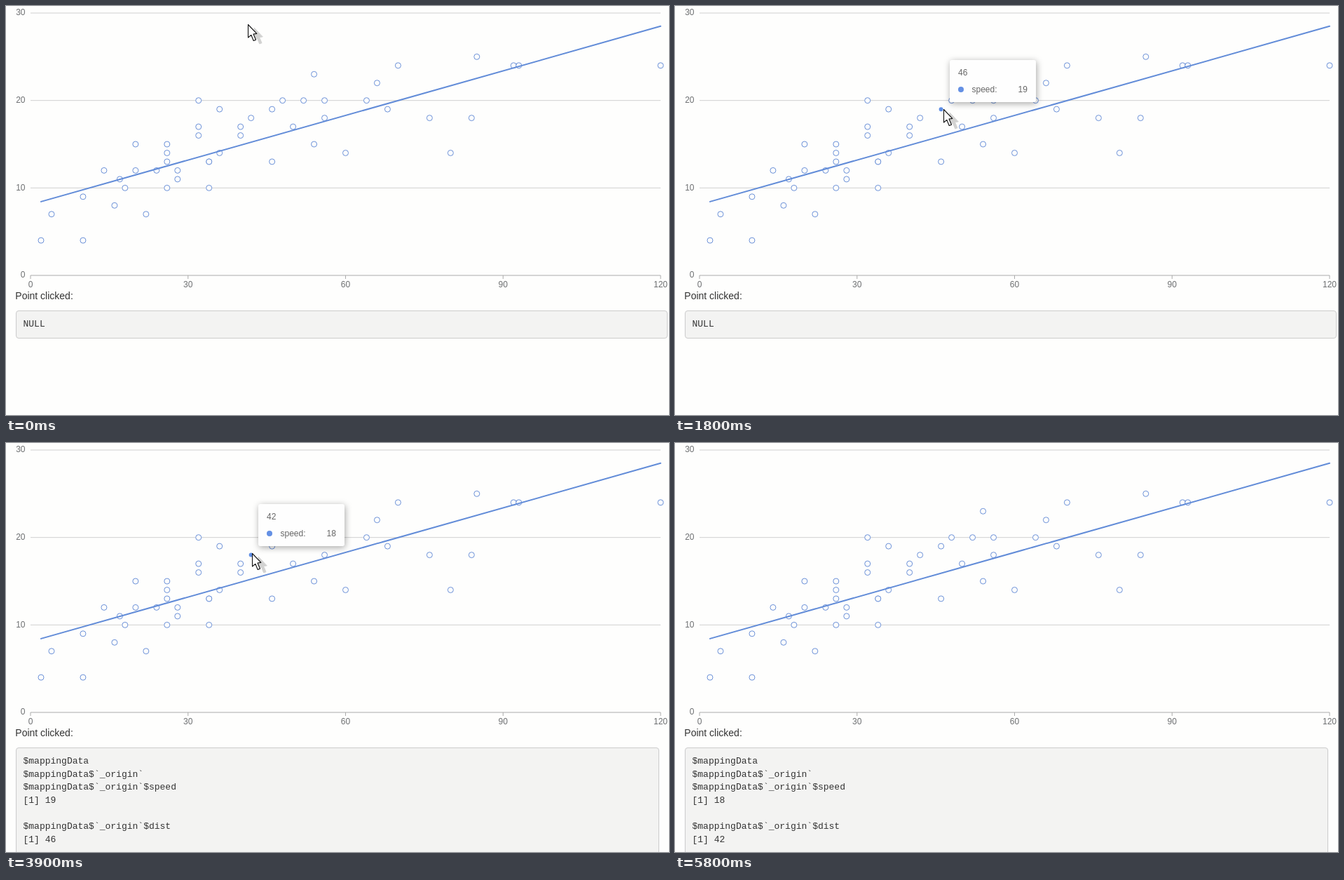
These frames come from a looping animation (946 px wide and 583 px high, 6.4 s). An HTML page:

```html
<!DOCTYPE html>
<html lang="en">
<head>
<meta charset="utf-8">
<title>Scatter plot with tooltip</title>
<style>
  html, body { margin: 0; width: 100%; height: 100%; overflow: hidden; background: #fefefd; }
  svg { display: block; font: 12px "Liberation Sans", Arial, sans-serif; }
  .grid { stroke: #d0d0d0; }
  .axis { stroke: #ababab; }
  .label { fill: #6e7072; }
  .ring { fill: #fefefd; stroke: #6a90d8; }
  .fit { stroke: #628cd8; stroke-width: 2; stroke-linecap: round; }
  .dot { fill: #5f8ee4; stroke: #fefefd; stroke-width: 2; }
  .heading { font-size: 14px; fill: #333; }
  .panel { fill: #f3f3f2; stroke: #ccc; }
  .mono { font: 13px "Liberation Mono", "Courier New", monospace; fill: #333; }
  .tip text { fill: #666; }
  .card { fill: #fefefe; filter: drop-shadow(1px 2px 5px rgba(0, 0, 0, .35)); }
  .arrow { fill: #fefefe; stroke: #111; stroke-width: 1.1; stroke-linejoin: round; }
  .shade { fill: #000; stroke: #000; opacity: .17; filter: blur(.7px); }
</style>
</head>
<body>
<script>
const LOOP = 6400, STEP = 100;

// Stopping distances grouped by speed.
const cars = {
  4: [2, 10], 7: [4, 22], 8: [16], 9: [10], 10: [18, 26, 34], 11: [17, 28],
  12: [14, 20, 24, 28], 13: [26, 34, 34, 46], 14: [26, 36, 60, 80],
  15: [20, 26, 54], 16: [32, 40], 17: [32, 40, 50], 18: [42, 56, 76, 84],
  19: [36, 46, 68], 20: [32, 48, 52, 56, 64], 22: [66], 23: [54],
  24: [70, 92, 93, 120], 25: [85]
};
const first = { dist: 46, speed: 19 }, second = { dist: 42, speed: 18 };

// Pointer stops: time, x, y.
const path = [
  [300, 345, 26], [500, 350, -50], [700, 350, -50], [1100, 371, 119],
  [1500, 383, 147], [3200, 383, 147], [3500, 366, 145], [3600, 359, 152],
  [3800, 351, 157], [5000, 351, 157], [5700, 97, 4], [5800, 95, -50]
];
const hovers = [
  [0, null], [900, "line"], [1400, first], [3200, "line"],
  [3800, second], [5100, "line"], [5800, null]
];
const clicks = [[0, null], [2400, first], [4400, second]];

const px = d => 35 + d * 899 / 120;
const py = s => 384 - s * 374 / 30;
const fit = d => 8.09 + 0.17 * d;

function make(parent, tag, attrs = {}, text = "") {
  const node = document.createElementNS("http://www.w3.org/2000/svg", tag);
  set(node, attrs);
  node.textContent = text;
  return parent.appendChild(node);
}
function set(node, attrs) {
  for (const key in attrs) node.setAttribute(key, attrs[key]);
}
const line = (cls, x1, y1, x2, y2) => make(svg, "line", { class: cls, x1, y1, x2, y2 });
const moveTo = (node, x, y) => set(node, { transform: `translate(${x} ${y})` });
const show = (node, on) => set(node, { visibility: on ? "visible" : "hidden" });
const latest = (rows, t) => rows.filter(row => row[0] <= t).pop()[1];

function pointer(t) {
  const i = path.findIndex(row => row[0] >= t);
  const b = i < 0 ? path[path.length - 1] : path[i];
  if (i < 1) return { x: b[1], y: b[2] };
  const a = path[i - 1], k = (t - a[0]) / (b[0] - a[0]);
  const mix = n => Math.round(a[n] + (b[n] - a[n]) * k);
  return { x: mix(1), y: mix(2) };
}
function linePoint(t) {
  const dist = Math.round((pointer(t).x - 35) * 120 / 899);
  return { dist, speed: +fit(dist).toFixed(2) };
}

const svg = make(document.body, "svg", { width: 946, height: 583, viewBox: "0 0 946 583" });

// Chart
for (let s = 0; s <= 30; s += 10) {
  const y = py(s);
  line(s ? "grid" : "axis", 35, y, 934, y);
  make(svg, "text", { class: "label", x: 27.5, y: Math.round(y + 3.3), "text-anchor": "end" }, s);
}
for (let d = 0; d <= 120; d += 30) {
  line("axis", px(d), 384, px(d), 389);
  make(svg, "text", { class: "label", x: px(d), y: 401, "text-anchor": "middle" }, d);
}
for (const s in cars)
  for (const d of cars[s]) make(svg, "circle", { class: "ring", cx: px(d), cy: py(s), r: 4 });
line("fit", px(2), py(fit(2)), px(120), py(fit(120)));
const dot = make(svg, "circle", { class: "dot", r: 4 });

// Output panel
make(svg, "text", { class: "heading", x: 13.3, y: 418 }, "Point clicked:");
const panel = make(svg, "rect", { class: "panel", x: 14.5, y: 434.5, rx: 3.5 });
const rows = Array.from({ length: 7 }, (_, i) =>
  make(svg, "text", { class: "mono", x: 24.5, y: Math.round(457.3 + 18.57 * i) }));

// Tooltip
const tip = make(svg, "g", { class: "tip" });
const card = make(tip, "rect", { class: "card", height: 60, rx: 3 });
const title = make(tip, "text", { x: 12, y: 22 });
make(tip, "circle", { cx: 16, cy: 42, r: 4, fill: "#6490e4" });
make(tip, "text", { x: 31.5, y: 46 }, "speed:");
const value = make(tip, "text", { x: 97.5, y: 46 });

// Pointer
const cursor = make(svg, "g");
const arrow = "M.5 .5V19L4.8 15.3L8.2 23.5L11.5 22.2L8 14L12.8 13.4Z";
make(cursor, "path", { class: "shade", d: arrow, transform: "translate(8.5 4.5)" });
make(cursor, "path", { class: "arrow", d: arrow });

function drawOutput(point) {
  set(panel, { width: point ? 917 : 929, height: point ? 200 : 39 });
  const base = "$mappingData", inner = base + "$`_origin`";
  const text = point
    ? [base, inner, inner + "$speed", "[1] " + point.speed, "", inner + "$dist", "[1] " + point.dist]
    : ["NULL"];
  rows.forEach((row, i) => row.textContent = text[i] || "");
}

// The label runs one step ahead of the drawn pointer, the card one step behind.
function drawHover(hover, t) {
  show(tip, hover);
  show(dot, hover);
  if (!hover) return;
  const onLine = hover === "line";
  const at = onLine ? linePoint(t) : hover;
  const shown = onLine ? linePoint(t + STEP) : hover;
  set(dot, { cx: px(at.dist), cy: py(at.speed) });
  title.textContent = shown.dist;
  value.textContent = shown.speed;
  set(card, { width: 110 + Math.round(value.getComputedTextLength()) });
  const { x, y } = pointer(t - STEP);
  moveTo(tip, x + 9, y - 70);
}

let last = -1;
function draw(now) {
  const t = Math.floor((now % LOOP) / STEP) * STEP;
  if (t === last) return;
  last = t;
  const { x, y } = pointer(t);
  moveTo(cursor, x, y);
  drawHover(latest(hovers, t), t);
  drawOutput(latest(clicks, t));
}

const start = performance.now();
function tick() {
  draw(performance.now() - start);
  requestAnimationFrame(tick);
}
tick();
</script>
</body>
</html>
```
